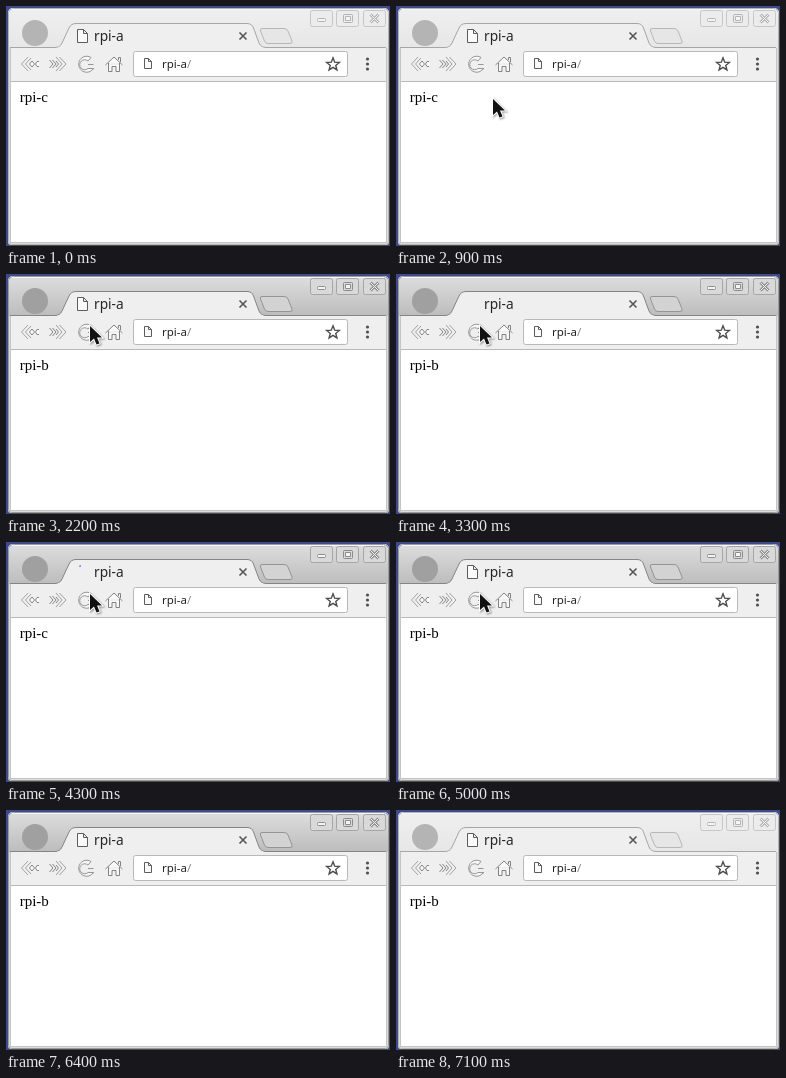
These frames come from a looping animation (384 by 240 pixels, 7.2 s). An HTML page with a canvas:

```html
<!DOCTYPE html>
<html lang="en">
<meta charset="utf-8">
<title>Browser reload</title>
<style>
html, body { margin: 0; width: 100%; height: 100%; overflow: hidden; background: #3d4b8e }
canvas { display: block; width: 384px; height: 240px }
</style>
<canvas id="stage" width="384" height="240"></canvas>
<script>
const c = document.getElementById('stage').getContext('2d');
const LOOP = 7200, STEP = 100, LOAD = 350;
const clicks = [1800, 3250, 4200];
const hosts = ['rpi-c', 'rpi-b', 'rpi-c', 'rpi-b'];
// Pointer path: time, x, y
const path = [
  [500, 143, 240], [900, 97, 93], [1500, 84, 52],
  [5500, 84, 52], [5700, 127, 85], [6300, 330, 241]
];

function shape(d, fill, stroke, width = 1) {
  const p = new Path2D(d);
  if (fill) { c.fillStyle = fill; c.fill(p); }
  if (stroke) { c.strokeStyle = stroke; c.lineWidth = width; c.stroke(p); }
}

function box(x, y, w, h, r, fill, stroke) {
  c.beginPath();
  c.roundRect(x, y, w, h, r);
  if (fill) { c.fillStyle = fill; c.fill(); }
  if (stroke) { c.strokeStyle = stroke; c.lineWidth = 1; c.stroke(); }
}

function disc(x, y, r, fill) {
  c.beginPath();
  c.arc(x, y, r, 0, 7);
  c.fillStyle = fill;
  c.fill();
}

function text(s, x, y, font, fill) {
  c.font = font;
  c.fillStyle = fill;
  c.fillText(s, x, y);
}

function fade(y0, y1, from, to) {
  const g = c.createLinearGradient(0, y0, 0, y1);
  g.addColorStop(0, from);
  g.addColorStop(1, to);
  return g;
}

function frame(active) {
  c.fillStyle = '#3d4b8e';
  c.fillRect(0, 0, 384, 240);
  const bar = active ? fade(2, 41, '#dedede', '#bdbdbd') : fade(2, 41, '#efefef', '#e7e7e7');
  box(2, 2, 381, 237, [5, 5, 3, 3], '#dcdcdc');
  box(2, 2, 381, 40, [5, 5, 0, 0], bar);
  box(2.5, 2.5, 380, 236, [5, 5, 3, 3], null, active ? '#9b9b9b' : '#b4b4b4');
  shape('M6 3.5H378', null, '#f6f6f6');
  disc(29, 27, 13, active ? '#a0a0a0' : '#b4b4b4');

  const edge = active ? '#858585' : '#a6a6a6', ink = active ? '#8c8c8c' : '#b4b4b4';
  for (const x of [304.5, 330.5, 357.5])
    box(x, 4.5, 22, 16, 2, active ? '#d9d9d9' : '#ececec', active ? '#a5a5a5' : '#c6c6c6');
  box(311.5, 12.5, 8, 3, 1, '#f5f5f5', ink);
  box(337.5, 8.5, 9, 8, 1, null, ink);
  box(339.5, 10.5, 5, 4, 0, '#f5f5f5', ink);
  const cross = 'M364.5 8.5L372.5 16.5M372.5 8.5L364.5 16.5';
  shape(cross, null, ink, 3);
  shape(cross, null, '#f5f5f5');

  shape('M256 22.5H278Q281 22.5 282 25L286 35Q287 37.5 284 37.5H262Q259.500 37.500 258.500 35L254.500 25Q253.500 22.500 256 22.500Z',
    active ? '#d3d3d3' : '#e6e6e6', active ? '#949494' : '#b7b7b7');
  c.fillStyle = '#efefef';
  c.fillRect(5, 41, 375, 35);
  shape('M4 41.5H49Q54 41.500 56 37L63 22Q65 17.500 70 17.500H241Q246 17.500 247.500 22L253 37Q255 41.500 260 41.500H380', '#efefef', edge);
  c.fillStyle = '#efefef';
  c.fillRect(52, 41, 205, 2);
}

function leaf(x, y, w, h, fold) {
  shape(`M${x} ${y}h${w - fold}l${fold} ${fold}v${h - fold}h${-w}ZM${x + w - fold} ${y}v${fold}h${fold}`, '#fafafa', '#5c5c5c');
}

function toolbar() {
  // Back and forward
  shape('M22 51L15.500 58L22 65M25 52L19.500 58L25 64', null, '#a1a1a1');
  shape('M26 55L23.500 58L26 61L28.500 58ZM33 55.500H31L29.500 58L31 60.500H33', '#fafafa', '#858585');
  shape('M50 51L56 58L50 65M53.500 51L60 58L53.500 65', null, '#a1a1a1');
  shape('M43.500 54L47 58L43.500 62M46.500 54L50 58L46.500 62M50 55L52.500 58L50 61', null, '#858585');
  // Reload
  shape('M85 51.500A8 8 0 1 0 84 65.500L88 62.500H82A5 5 0 1 1 82 55ZM82 58.500H87.500', '#f8f8f8', '#979797');
  // Home
  shape('M99.500 59L108 51L116.500 59M102.500 57V65.500H106V60.500H110V65.500H113.500V57M112.500 54V51.500H114.500V56', '#f8f8f8', '#818181');
  box(127.5, 45.5, 214, 25, 2, '#fff', '#b9b9b9');
  leaf(138.5, 52.5, 7, 10, 3);
  const font = '500 11.5px "Noto Sans", sans-serif';
  text('rpi-a', 156, 62, font, '#222');
  text('/', 156 + c.measureText('rpi-a').width, 62, font, '#888');

  c.beginPath();
  for (let i = 0; i < 10; i++) {
    const a = i * Math.PI / 5 - Math.PI / 2, r = i % 2 ? 2.9 : 6.7;
    c.lineTo(327 + r * Math.cos(a), 58.5 + r * Math.sin(a));
  }
  c.closePath();
  c.strokeStyle = '#4c4c4c';
  c.lineWidth = 1.4;
  c.stroke();
  for (const y of [53, 58, 63]) disc(361.5, y, 1.6, '#505050');
}

function tab(wait) {
  if (wait < 0) leaf(71.5, 23.5, 10, 13, 4);
  else if (wait > 50) {
    const start = -1.9;
    c.beginPath();
    c.arc(77, 30, 6.5, start, start - (wait - 50) / 200, true);
    c.strokeStyle = '#7187d8';
    c.lineWidth = 1.6;
    c.stroke();
  }
  text('rpi-a', 88, 35, '500 13.7px "Noto Sans", sans-serif', '#262626');
  shape('M233.500 26.500L240.500 33.500M240.500 26.500L233.500 33.500', null, '#555', 1.6);
}

function page(host) {
  c.fillStyle = '#fff';
  c.fillRect(5, 76, 375, 160);
  shape('M5 75.500H380', null, '#b9b9b9');
  shape('M4.500 42V236.500H380.500V42', null, '#c4c4c4');
  text(host, 13.7, 96, '15px "Liberation Serif", serif', '#000');
}

function pointer(t) {
  const i = path.findIndex(p => p[0] > t);
  if (i < 1) return;
  const [t0, x0, y0] = path[i - 1], [t1, x1, y1] = path[i];
  const k = (t - t0) / (t1 - t0);
  c.save();
  c.translate(x0 + (x1 - x0) * k, y0 + (y1 - y0) * k);
  c.shadowColor = '#0006';
  c.shadowBlur = 2;
  c.shadowOffsetX = c.shadowOffsetY = 1;
  const arrow = 'M0 0V16L4 12.500L6.500 18.500L9.500 17.500L7 11.500H12Z';
  shape(arrow, null, '#fff', 2);
  c.shadowColor = 'transparent';
  shape(arrow, '#111');
  c.restore();
}

function draw(now) {
  const t = Math.floor(now % LOOP / STEP) * STEP;
  const done = clicks.filter(s => t >= s + LOAD).length;
  const begun = clicks.filter(s => t >= s).length;
  frame(t >= 1700 && t < 6500);
  toolbar();
  tab(begun > done ? t - clicks[done] : -1);
  page(hosts[done]);
  pointer(t);
  requestAnimationFrame(draw);
}
requestAnimationFrame(draw);
</script>
</html>
```
